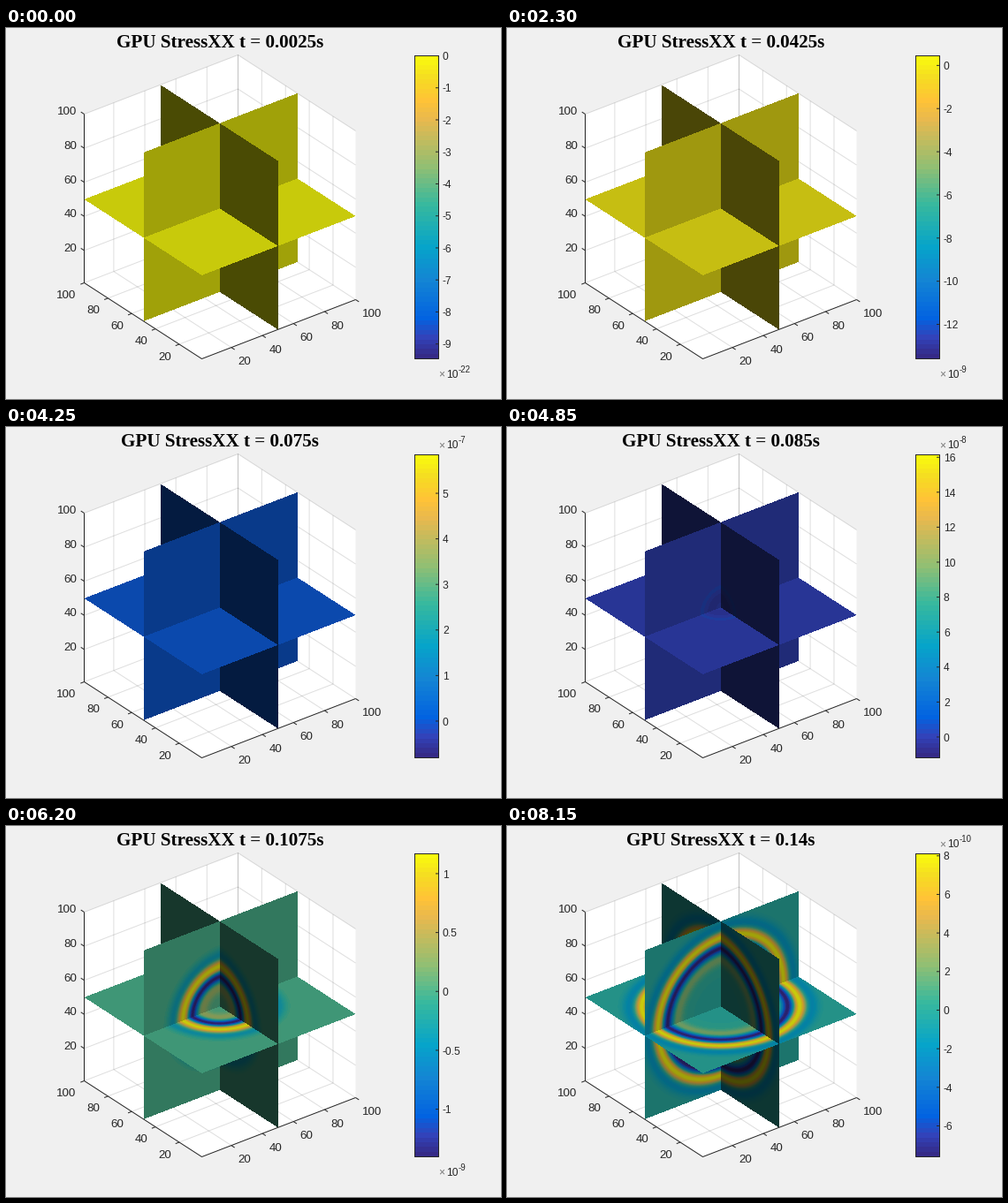
A matplotlib script that plays this animation: 560 by 420 pixels, repeating every 8.3 s.

```python
import math
import numpy as np
import matplotlib.pyplot as plt
from matplotlib.animation import FuncAnimation
from matplotlib.colors import LinearSegmentedColormap

W, H, DPI = 560, 420, 100
PX = 72 / DPI
INK = "#262626"

fig = plt.figure(figsize=(W / DPI, H / DPI), dpi=DPI, facecolor="#f0f0f0")
ax = fig.add_axes([0, 0, 1, 1])
ax.axis("off")


def label(x, y, s="", px=13.33, **kw):
    """Text whose digits are centred on height y."""
    kw = {"family": "Liberation Sans", "color": INK, **kw}
    return ax.text(x, y + 0.36 * px, s, fontsize=px * PX, va="baseline",
                   zorder=6, **kw)


def path(points, z=5, **kw):
    xs, ys = np.reshape(points, (-1, 2)).T
    return ax.plot(xs, ys, color=INK, lw=PX, zorder=z, snap=False,
                   solid_capstyle="butt", **kw)[0]


# Blue to yellow in 64 levels
STOPS = [(0, "#352a87"), (4, "#3243ba"), (8, "#0363e1"), (16, "#1485d4"),
         (23, "#06a4ca"), (32, "#38b99e"), (40, "#92bf73"), (50, "#e9b94e"),
         (54, "#ffc337"), (59, "#f5de21"), (63, "#f9fb0e")]
ramp = LinearSegmentedColormap.from_list(
    "ramp", [(i / 63, c) for i, c in STOPS], N=64)
COLORS = ramp(np.arange(64))[:, :3]

# Projection of the unit cube onto the stage
ORIGIN = np.array([221.5, 374.5])
EX, EY, EZ = np.array([[174, -67], [-133, -86], [0, -191]], float)


def proj(x, y, z):
    return ORIGIN + x * EX + y * EY + z * EZ


def draw_box():
    hull = [(0, 1, 1), (1, 1, 1), (1, 0, 1), (1, 0, 0), (0, 0, 0), (0, 1, 0)]
    ax.fill(*np.array([proj(*c) for c in hull]).T, color="white", lw=0, zorder=1)
    tick_x, tick_y = 4.5 * EX / np.hypot(*EX), 4.5 * EY / np.hypot(*EY)
    for v in range(20, 101, 20):
        u = (v - 1) / 99
        # each grid line runs over the floor or a wall and up the next wall
        for a, b, c in [((u, 0, 0), (u, 1, 0), (u, 1, 1)),
                        ((0, u, 0), (1, u, 0), (1, u, 1)),
                        ((0, 1, u), (1, 1, u), (1, 0, u))]:
            path([proj(*a), proj(*b), proj(*c)], z=2, alpha=0.15)
        px, py, pz = proj(u, 0, 0), proj(0, u, 0), proj(0, 1, u)
        path([px, px - tick_y])
        path([py, py - tick_x])
        path([pz, pz + tick_y])
        label(px[0] + 7.4, px[1] + 15, str(v), ha="left")
        label(py[0] - 9, py[1] + 12.8, str(v), ha="right")
        label(pz[0] - 8, pz[1] - 3.8, str(v), ha="right")
    path([proj(1, 0, 0), proj(0, 0, 0), proj(0, 1, 0), proj(0, 1, 1)])


def trace_slices():
    """Light and centre distance of the nearest slice at every pixel."""
    mid = 49 / 99
    gy, gx = np.mgrid[0:H, 0:W] + 0.5
    dx, dy = gx - ORIGIN[0], gy - ORIGIN[1]
    det = EX[0] * EY[1] - EX[1] * EY[0]
    base = np.stack([(dx * EY[1] - dy * EY[0]) / det,
                     (EX[0] * dy - EX[1] * dx) / det, np.zeros_like(dx)])
    # direction towards the viewer: it projects to a single point
    view = np.array([-1, EX[0] / EY[0], 0])
    view[2] = -(view[0] * EX[1] + view[1] * EY[1]) / EZ[1]
    best = np.full((H, W), -np.inf)
    light, dist = np.zeros((H, W)), np.zeros((H, W))
    for axis, level in enumerate((0.30, 0.645, 0.805)):
        s = (mid - base[axis]) / view[axis]
        p = base + s * view[:, None, None]
        r = 99 * np.sqrt(((p - mid) ** 2).sum(axis=0))
        hit = (np.abs(p - 0.5) <= 0.5).all(axis=0) & (s > best)
        best[hit], light[hit], dist[hit] = s[hit], level, r[hit]
    return light, dist


light, dist = trace_slices()
MASK = light > 0
LIGHT, RADIUS = light[MASK][:, None], dist[MASK]
rgba = np.zeros((H, W, 4))
rgba[MASK, 3] = 1

draw_box()
slices = ax.imshow(rgba, extent=(0, W, H, 0), aspect="auto",
                   interpolation="nearest", zorder=3)

# Colour bar
LEFT, RIGHT, TOP, BOTTOM = 462.5, 489.5, 31.5, 374.5
ax.imshow(COLORS[::-1, None], extent=(LEFT, RIGHT, BOTTOM, TOP),
          aspect="auto", interpolation="nearest", zorder=3)
path([(LEFT, TOP), (RIGHT, TOP), (RIGHT, BOTTOM), (LEFT, BOTTOM), (LEFT, TOP)])
bar_ticks = path([(RIGHT, TOP)])
bar_labels = [label(494, 0, px=12) for _ in range(12)]
times = label(489.5, 0, "×", px=12, color="#777777")
ten = label(498.5, 0, "10", px=12)
power = label(512, 0, px=9.6)
title = label(242, 14.6, px=21.1, ha="center", family="Liberation Serif",
              weight="bold", color="black")
ax.set_xlim(0, W)
ax.set_ylim(H, 0)

# Source pulse and the wave it sends out
DELAY, DECAY, GAIN = 0.0676, 8661, 1.269e-4
SPEED, WIDTH = 515, 4.15


def stress(t):
    """Field on the slices with its lowest and highest value."""
    d = t - DELAY
    src = GAIN * d * math.exp(-DECAY * d * d)
    back = -0.158 * math.exp(-(d / 0.02) ** 2) * src
    neg = pos = 0.0
    field = np.zeros_like(RADIUS)
    if d > 0.012:
        front = SPEED * d
        neg = 2.07e-9 * (14.1 / front) ** 1.03
        pos = 1.17e-9 * (20.5 / front) ** 0.614
        x = (front - RADIUS) / WIDTH
        wave = (x ** 3 - 3 * x) * np.exp(-x * x / 2) / 1.38
        field = wave * np.where(wave > 0, pos, neg)
    return field, min(src, back, -neg), max(src + pos / 2, back, pos)


def nice_step(span):
    """Mantissa and exponent of a round step, at most ten per span."""
    raw = span / 10
    e = math.floor(math.log10(raw))
    raw /= 10.0 ** e
    if raw <= 2:
        return (1 if raw <= 1 else 2), e
    return (0.5 if raw <= 5 else 1), e + 1


def draw_bar(lo, hi):
    m, e = nice_step(hi - lo)
    step = m * 10.0 ** e
    first, last = math.ceil(lo / step - 1e-9), math.floor(hi / step + 1e-9)
    xs, ys = [], []
    for n, text in enumerate(bar_labels, first):
        text.set_visible(n <= last)
        if n <= last:
            y = BOTTOM - (n * step - lo) / (hi - lo) * (BOTTOM - TOP)
            xs += [RIGHT - 3.5, RIGHT, np.nan]
            ys += [y, y, np.nan]
            text.set_text(f"{n * m:g}")
            text.set_y(y + 4.7)
    bar_ticks.set_data(xs, ys)
    y = 24.5 if hi > -lo else 395.5
    times.set_y(y)
    ten.set_y(y)
    power.set_y(y - 6)
    power.set_text(str(e))


def update(i):
    k = (i + 2) // 3
    t = 0.0025 * (k + 1)
    field, lo, hi = stress(t)
    level = np.clip((field - lo) / (hi - lo) * 64, 0, 63).astype(int)
    rgba[MASK, :3] = COLORS[level] * LIGHT
    slices.set_data(rgba)
    draw_bar(lo, hi)
    title.set_text(f"GPU StressXX t = {round(t, 4):g}s")
    return []


anim = FuncAnimation(fig, update, frames=166, interval=50, repeat=True,
                     repeat_delay=0, blit=False)
plt.show()
```
